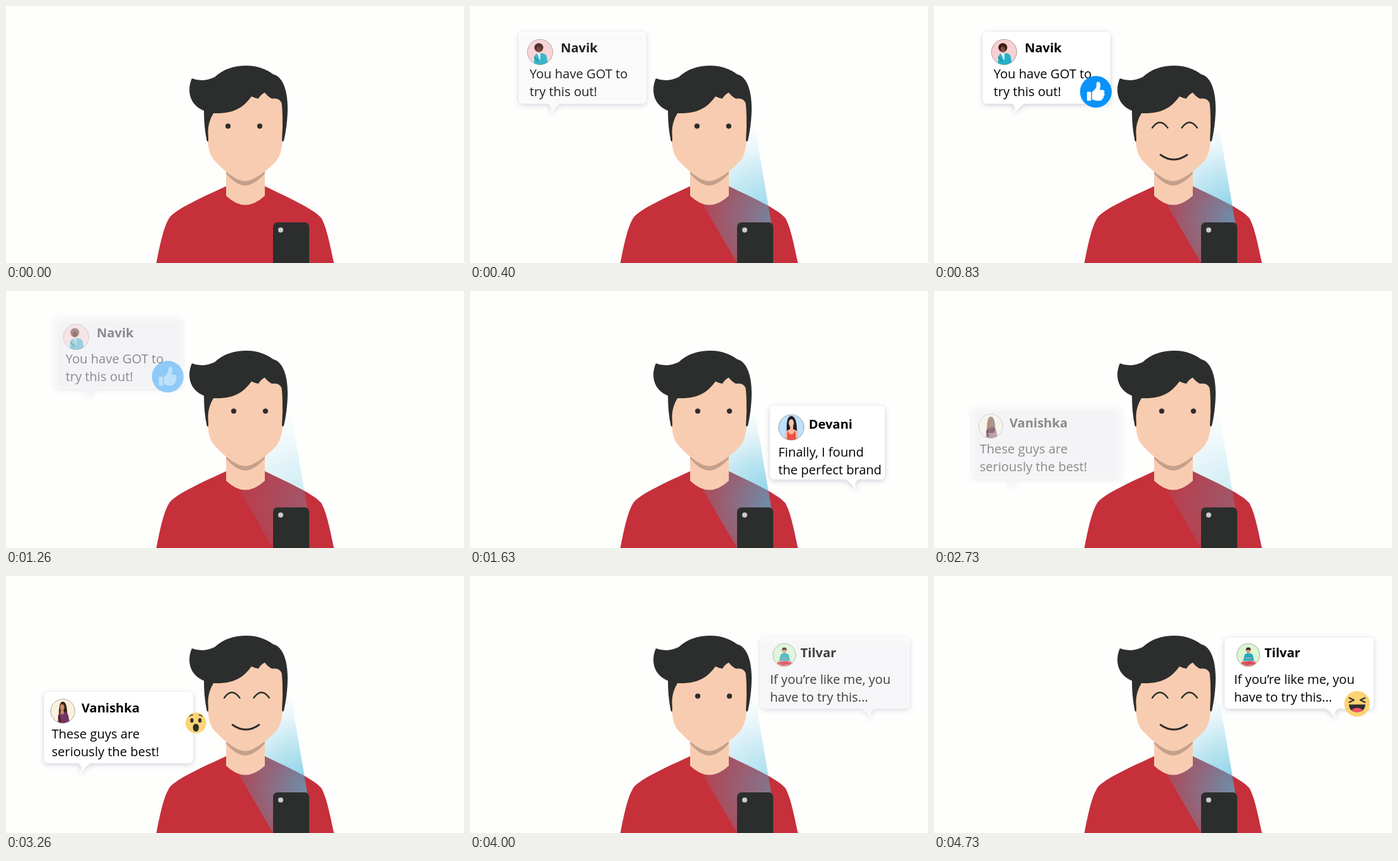
An HTML page with a canvas that plays this animation: 722 px wide and 405 px high, repeating every 4800 ms.

```html
<!DOCTYPE html>
<html lang="en">
<head>
<meta charset="utf-8">
<title>Word of mouth</title>
<style>
  html, body { margin: 0; width: 100%; height: 100%; overflow: hidden; background: #fefefd; }
  canvas { display: block; width: 100vw; height: 100vh; }
</style>
</head>
<body>
<canvas id="stage" width="722" height="405"></canvas>
<script>
const ctx = document.getElementById('stage').getContext('2d');
const LOOP = 4800, FADE = 230;
const INK = '#2c2e2d', SKIN = '#f8ccb0', SHIRT = '#c5303b';
const clamp = v => Math.max(0, Math.min(1, v));

const scenes = [
  { show: 200, react: 600, hide: 1130, card: [77, 41, 201, 113], tail: [121, 1],
    avatar: { x: 110.5, y: 72.5, r: 20, draw: teal, bg: '#f9cfd2' },
    name: ['Navik', 143, 73], lines: ['You have GOT to', 'try this out!'], text: [94, 114],
    from: [459, 303], to: [255, 135], emoji: like },
  { show: 1400, react: 1800, hide: 2330, card: [473, 181, 181, 116], tail: [614, -1],
    avatar: { x: 506.5, y: 215, r: 20, draw: red, bg: '#c0e0fa' },
    name: ['Devani', 534, 217], lines: ['Finally, I found', 'the perfect brand'], text: [486, 261],
    from: [616, 356], to: [649, 204.5], emoji: love },
  { show: 2630, react: 3000, hide: 3530, card: [60, 183, 235, 112], tail: [112, 1],
    avatar: { x: 89.5, y: 213, r: 19, draw: purple, bg: '#fbf2da' },
    name: ['Vanishka', 119, 214.5], lines: ['These guys are', 'seriously the best!'], text: [72, 256],
    from: [400, 318], to: [297, 229.5], emoji: wow },
  { show: 3830, react: 4060, hide: LOOP, card: [458, 97, 235, 112], tail: [639, -1],
    avatar: { x: 495.5, y: 124.5, r: 18, draw: seated, bg: '#dcf5d2' },
    name: ['Tilvar', 521, 128], lines: ['If you’re like me, you', 'have to try this...'], text: [473, 170],
    from: [434, 292], to: [667, 201.5], emoji: laugh }
];

function fill(d, color) {
  ctx.fillStyle = color;
  ctx.fill(new Path2D(d));
}

function line(d, width, color = INK) {
  ctx.strokeStyle = color;
  ctx.lineWidth = width;
  ctx.lineCap = ctx.lineJoin = 'round';
  ctx.stroke(new Path2D(d));
}

function oval(x, y, rx, ry, color) {
  ctx.fillStyle = color;
  ctx.beginPath();
  ctx.ellipse(x, y, rx, ry, 0, 0, Math.PI * 2);
  ctx.fill();
}

const dot = (x, y, r, color) => oval(x, y, r, r, color);

function box(x, y, w, h, r, color) {
  ctx.fillStyle = color;
  ctx.beginPath();
  ctx.roundRect(x, y, w, h, r);
  ctx.fill();
}

// Small portraits, drawn around their centre.
function teal() {
  dot(-2, -7, 7, '#3c1c1b');
  oval(-2, -4, 3.3, 4.5, '#84503a');
  fill('M-10 22 L-9 7 Q-7 2 -2 2 Q7 1 10 6 L13 22 Z', '#22b1c9');
  fill('M-5 2 L1 2 L0 14 Z', '#f5f5f5');
  line('M-9 8 L-3 15', 1.2, '#137f96');
}

function red() {
  fill('M-7 9 Q-9 -18 0 -18 Q9 -18 9 9 Q3 11 0 9 Z', '#1f1b24');
  fill('M-11 22 L-9 7 Q-4 3 -2 3 L-2 -3 H3 V3 Q9 4 10 8 L11 22 Z', '#f4b99c');
  oval(0, -7, 4, 6, '#f7c4a9');
  fill('M-7 22 L-6 5 Q0 17 6 5 L8 22 Z', '#ec5044');
}

function purple() {
  fill('M-6 10 Q-7 -15 0 -15 Q7 -15 7 6 Q5 11 2 11 Z', '#3d211d');
  fill('M-8 20 L-7 6 Q-4 1 0 1 Q8 1 9 8 L11 20 Z', '#713762');
  oval(-1, -6, 3.4, 5, '#c98d6d');
  fill('M-3 -2 H1 L2 3 L-1 6 L-4 3 Z', '#c98d6d');
  line('M-6 8 L-4 16', 2.6, '#3d211d');
}

function seated() {
  fill('M-10 18 Q-14 9 -6 9 H8 Q15 10 11 18 Z', '#ef7f8c');
  line('M-9 13 L5 11 M9 13 L-4 15', 2.4, '#d64a57');
  fill('M-8 9 L-6 0 Q-4 -3 0 -3 Q5 -3 7 0 L9 9 Z', '#25a9c4');
  oval(0, -6.5, 3, 4, '#d99877');
  fill('M-4 -7 Q-4 -12 0 -12 Q4 -12 4 -7 Q0 -10 -4 -7 Z', '#40211f');
  line('M-4 5 H4', 1.6, '#e9a886');
}

// Reactions, drawn around their centre.
function like() {
  dot(0, 0, 25, '#0993f8');
  box(-14, 0, 6.5, 14, 1, '#fff');
  fill('M-6 0 Q0 -4 1 -9 Q0 -16 4 -16 Q8 -15 7 -8 L6 -3 H11 Q15 -2 13 2 Q15 5 12 7 Q13 10 10 11 Q10 14 6 14 H0 L-6 12 Z', '#fff');
}

function love() {
  dot(0, 0, 18.3, '#fb4164');
  fill('M0 10 C-17 -1 -10 -11 -4 -9 Q-1 -8 0 -5 Q1 -8 4 -9 C10 -11 17 -1 0 10 Z', '#fff');
}

function wow() {
  dot(0, 0, 16.3, '#fdd377');
  oval(-6.3, -4, 2.6, 3.6, INK);
  oval(6.3, -4, 2.6, 3.6, INK);
  oval(0, 7.5, 4.7, 6.2, INK);
  line('M-9.5 -10.5 Q-7.5 -13 -5 -12.5 M9.5 -10.5 Q7.5 -13 5 -12.5', 1.3);
}

function laugh() {
  dot(0, 0, 20.2, '#fdd273');
  line('M-12.5 -9.5 L-5 -6 L-12.5 -2.5 M12.5 -9.5 L5 -6 L12.5 -2.5', 2);
  fill('M-13 1 H13 Q12 13 0 13 Q-12 13 -13 1 Z', INK);
  fill('M-9 9.5 Q0 3 9 9.5 Q6 13 0 13 Q-6 13 -9 9.5 Z', '#f4506b');
}

function beam(alpha) {
  const glow = ctx.createRadialGradient(470, 335, 0, 470, 335, 150);
  for (const [stop, a] of [[0, .68], [.25, .5], [.5, .33], [.75, .13], [1, 0]])
    glow.addColorStop(stop, `rgba(69,184,221,${a})`);
  ctx.globalAlpha = alpha;
  fill('M421 405 L340 267 L360 195 H450 L475 342 V405 Z', glow);
  ctx.globalAlpha = 1;
}

function person(glow, look, happy) {
  fill('M237 405 C242 380 248 348 258 333 C270 319 310 301 347 284 H408 C445 302 484 319 497 334 C506 350 511 378 517 405 Z', SHIRT);
  if (glow) beam(glow);
  fill('M347 250 H408 V299 Q377 328 347 299 Z', SKIN);
  fill('M347 250 H408 V264 Q392 282 377 283 Q362 282 347 264 Z', '#c4a08a');
  fill('M318 165 V213 C320 229 322 236 329 244 Q350 266 365 273 Q377 279 389 273 Q410 262 427 243 C433 234 435 225 436 212 L437 135 H330 Z', SKIN);
  fill(`M293 114 Q310 121 329 112 C343 99 360 94 379 94 C397 94 411 100 421 107.5
    C437 111 444 135 444 160 C444 180 441 200 438 212 Q436.5 215 435 212 L436 190
    C436 175 436 165 434.5 153 Q431 144 419 146 Q413 143 408 136.5 Q402 139 398 146
    Q392 145 387 142.5 C375 158 363 170 327 169 Q319 182 318.5 197 L319 212
    Q318 215.5 316.5 212 Q312 190 312 165 C291 157 284 135 293 114 Z`, INK);
  if (happy) {
    line('M344 192 Q356 175 368.5 192 M390.5 192 Q403 175 415 192', 2.3);
    line('M357 234.5 Q378 249.5 399 234.5', 2.8);
  } else {
    dot(350 + 9 * look, 189.3, 4.1, INK);
    dot(400 + 9 * look, 189.3, 4.1, INK);
  }
  box(421, 341, 57, 80, 7, INK);
  dot(433, 353, 4, '#cbcbcb');
}

function bubble(s) {
  const [x, y, w, h] = s.card, [tip, dir] = s.tail, base = y + h;
  const shape = new Path2D();
  shape.roundRect(x, y, w, h, 6);
  shape.moveTo(tip + dir, base);
  shape.quadraticCurveTo(tip + dir * 13, base + 5, tip, base + 25);
  shape.quadraticCurveTo(tip + dir * 9, base + 9, tip + dir * 21, base);
  ctx.save();
  ctx.shadowColor = 'rgba(80,80,125,.27)';
  ctx.shadowBlur = 9;
  ctx.shadowOffsetY = 2;
  ctx.fillStyle = '#fff';
  ctx.fill(shape);
  ctx.restore();

  const a = s.avatar;
  ctx.save();
  ctx.translate(a.x, a.y);
  dot(0, 0, a.r, a.bg);
  ctx.save();
  ctx.clip();
  a.draw();
  ctx.restore();
  ctx.beginPath();
  ctx.arc(0, 0, a.r, 0, Math.PI * 2);
  ctx.lineWidth = .8;
  ctx.strokeStyle = '#8e9396';
  ctx.stroke();
  ctx.restore();

  ctx.fillStyle = '#000';
  ctx.font = 'bold 20px "Open Sans", sans-serif';
  ctx.fillText(...s.name);
  ctx.font = '20px "Open Sans", sans-serif';
  s.lines.forEach((str, i) => ctx.fillText(str, s.text[0], s.text[1] + 28 * i));
}

// Damped spring: overshoots, then rests on 1.
const spring = ms => 1 - Math.exp(-ms / 80) * Math.cos(ms / 307 * Math.PI * 2);

function reaction(s, ms) {
  const k = ms < 500 ? spring(ms) : 1;
  ctx.save();
  ctx.translate(...s.from.map((v, i) => v + (s.to[i] - v) * k));
  s.emoji();
  ctx.restore();
}

const level = (s, t) => clamp((t - s.show) / FADE) * (1 - clamp((t - s.hide) / FADE));

function draw(t) {
  ctx.fillStyle = '#fefefd';
  ctx.fillRect(0, 0, 722, 405);
  const glow = Math.max(...scenes.map(s => level(s, t)));
  const happy = scenes.some(s => t >= s.react && t < s.hide);
  person(glow, clamp((t - 200) / FADE), happy);
  for (const s of scenes) {
    const alpha = level(s, t);
    if (!alpha) continue;
    ctx.globalAlpha = alpha;
    bubble(s);
    if (t >= s.react) reaction(s, t - s.react);
    ctx.globalAlpha = 1;
  }
}

const start = performance.now();
function tick() {
  draw((performance.now() - start) % LOOP);
  requestAnimationFrame(tick);
}
tick();
</script>
</body>
</html>
```
